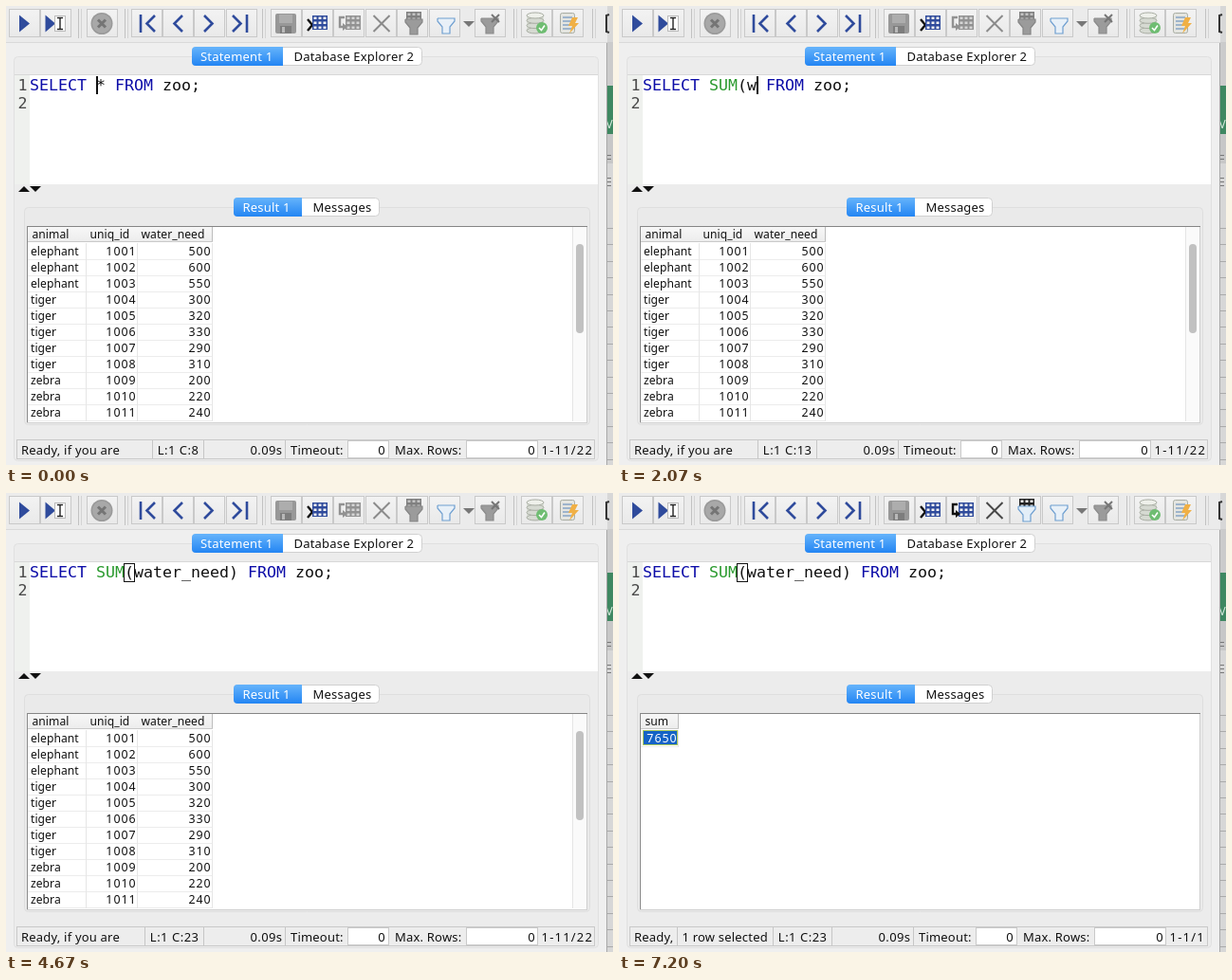
Write an HTML page with a canvas that moves like this. It is 640 px wide and 484 px high and loops after 7.27 s.

```html
<!DOCTYPE html>
<html lang="en">
<head>
<meta charset="utf-8">
<title>SQL editor</title>
<style>
html, body { margin: 0; width: 100%; height: 100%; overflow: hidden; background: #ececec; }
canvas { display: block; width: 640px; height: 484px; }
</style>
</head>
<body>
<canvas id="stage" width="640" height="484"></canvas>
<script>
const ctx = document.getElementById('stage').getContext('2d');
const LOOP = 7270, RUN = 4900, SELECT = 6000, BLINK = 500;
const NAVY = '#2f4b9c', GREY = '#929292', LINE = '#c9c9c9';
const UI = '"Noto Sans", "Open Sans", sans-serif';
const MONO = '"DejaVu Sans Mono", monospace';
const TYPED = 'SUM(water_need)';
const KEYS = [600, 870, 1070, 1700, 2000, 2150, 2270, 2400, 2500, 2750, 2930, 3070, 3200, 3330, 3600];
const ERASE = 330;
const NEEDS = [500, 600, 550, 300, 320, 330, 290, 310, 200, 220, 240];

function box(x, y, w, h, fill, stroke) {
  if (fill) { ctx.fillStyle = fill; ctx.fillRect(x, y, w, h); }
  if (stroke) {
    ctx.strokeStyle = stroke;
    ctx.lineWidth = 1;
    ctx.strokeRect(x + .5, y + .5, w - 1, h - 1);
  }
}

function round(x, y, w, h, r, fill, stroke) {
  ctx.beginPath();
  ctx.roundRect(x, y, w, h, r);
  if (fill) { ctx.fillStyle = fill; ctx.fill(); }
  if (stroke) { ctx.strokeStyle = stroke; ctx.lineWidth = 1; ctx.stroke(); }
}

function trace(pts) {
  ctx.beginPath();
  for (let i = 0; i < pts.length; i += 2) ctx.lineTo(pts[i], pts[i + 1]);
}

function poly(fill, ...pts) {
  trace(pts);
  ctx.closePath();
  ctx.fillStyle = fill;
  ctx.fill();
}

function line(color, width, ...pts) {
  trace(pts);
  ctx.strokeStyle = color;
  ctx.lineWidth = width;
  ctx.stroke();
}

function disc(x, y, r, fill) {
  ctx.beginPath();
  ctx.arc(x, y, r, 0, Math.PI * 2);
  ctx.fillStyle = fill;
  ctx.fill();
}

function text(s, x, y, { size = 13, gap = .2, color = '#111', align = 'left', font = UI } = {}) {
  ctx.font = `${size}px ${font}`;
  ctx.letterSpacing = gap + 'px';
  ctx.textAlign = align;
  ctx.fillStyle = color;
  ctx.fillText(s, x, y);
}

function vgrad(y0, y1, a, b) {
  const g = ctx.createLinearGradient(0, y0, 0, y1);
  g.addColorStop(0, a);
  g.addColorStop(1, b);
  return g;
}

function cross(x, y, r, color, width) {
  line(color, width, x - r, y - r, x + r, y + r);
  line(color, width, x + r, y - r, x - r, y + r);
}

function grid(x, y, cols, rows, color, cell = '#f2f2f2') {
  box(x, y, cols * 5 + 1, rows * 5, color);
  for (let c = 0; c < cols; c++)
    for (let r = 0; r < rows; r++) box(x + 1.5 + c * 5, y + 1.5 + r * 5, 3, 2.5, cell);
}

function funnel(x, y, fill, stroke) {
  const pts = [x - 9, y, x + 9, y, x + 9, y + 3, x + 4, y + 9, x + 4, y + 16, x - 4, y + 16, x - 4, y + 9, x - 9, y + 3];
  poly(fill, ...pts);
  line(stroke, 1.2, ...pts, x - 9, y);
}

function drum(x, y) {
  box(x - 9, y + 2, 18, 16, '#dce0d8');
  for (let i = 3; i >= 0; i--) {
    ctx.beginPath();
    ctx.ellipse(x, y + 2 + i * 5.3, 9, 3, 0, 0, Math.PI * 2);
    ctx.fillStyle = i ? '#d6dad2' : '#eef0ea';
    ctx.fill();
    ctx.strokeStyle = '#a9ada3';
    ctx.lineWidth = 1;
    ctx.stroke();
  }
}

function toolbar(selected) {
  box(0, 0, 634, 38, '#ebebeb');
  box(0, 38, 634, 1, '#d9d9d9');
  const groups = [[3, 2], [85, 1], [132, 4], [279, 6], [494, 1], [543, 2]];
  for (const [x, n] of groups)
    for (let i = 0; i < n; i++) box(x + i * 33.4 | 0, 3, 33, 30, vgrad(3, 33, '#f3f3f3', '#e9e9e9'), LINE);
  for (const x of [76, 125, 270, 535, 618]) {
    box(x, 3, 1, 31, '#c2c2c2');
    box(x + 3, 3, 1, 31, '#d4d4d4');
  }

  poly(NAVY, 14, 9.5, 25, 18.5, 14, 27.5);
  poly(NAVY, 41.5, 9.5, 52, 18.5, 41.5, 27.5);
  box(51, 10, 12, 17, '#fbfbfb', '#bbb');
  line('#222', 1.4, 54, 12.5, 60, 12.5);
  line('#222', 1.4, 57, 12.5, 57, 24.5);
  line('#222', 1.4, 54, 24.5, 60, 24.5);

  disc(101, 18.5, 11.5, '#9a9a9a');
  disc(101, 18.5, 10, '#a8a8a8');
  cross(101, 18.5, 4, '#757575', 3);

  line(NAVY, 2.6, 142, 9, 142, 28);
  line(NAVY, 2.6, 157, 10, 148.5, 18.5, 157, 27);
  line(NAVY, 2.6, 186, 10, 177.5, 18.5, 186, 27);
  line(NAVY, 2.6, 209, 10, 217.5, 18.5, 209, 27);
  line(NAVY, 2.6, 239, 10, 247.5, 18.5, 239, 27);
  line(NAVY, 2.6, 254, 9, 254, 28);

  round(284, 8, 22, 21, 2, '#989898');
  box(288, 9, 14, 9, '#adadad');
  box(289, 21, 12, 8, '#7d7d7d');
  box(291, 22, 3, 6, '#b8b8b8');

  line('#111', 2.4, 318, 14, 323, 20, 318, 26);
  grid(323, 10, 3, 3, NAVY);
  const dup = selected ? NAVY : GREY, arrow = selected ? '#111' : GREY;
  grid(358, 10, 3, 3, dup, selected ? '#f2f2f2' : '#d5d5d5');
  line(arrow, 2.4, 357, 12, 352, 12, 352, 22, 357, 22);
  poly(arrow, 355, 18, 360, 22, 355, 26);
  cross(396, 18.5, 8.5, selected ? '#484848' : '#8b8b8b', 2);

  grid(422, 6, 3, 2, selected ? '#222' : '#808080', selected ? '#f2f2f2' : '#c4c4c4');
  funnel(430, 14, selected ? '#e3eef8' : '#9b9b9b', selected ? '#6f9fd0' : '#868686');
  funnel(464, 13, '#e8f0f8', '#6f9fd0');
  poly('#777', 482, 16, 494, 16, 488, 22);
  funnel(510, 13, '#9b9b9b', '#8b8b8b');
  cross(516, 13, 4, '#757575', 2);

  drum(558, 8);
  disc(565, 23, 6, '#6fbd72');
  line('#fff', 1.6, 562, 23, 564.5, 25.5, 568, 20.5);
  round(584.5, 7.5, 15, 21, 2, '#e4e5e0', '#a9ada3');
  for (let y = 11; y < 27; y += 4) box(587, y, 10, 2, '#9db4cc');
  poly('#f0b045', 597, 12, 603, 12, 600, 18, 604, 18, 594, 29, 597, 21, 593, 21);
  line('#333', 2, 636, 9, 633, 10, 633, 27, 636, 28);
}

function backdrop() {
  box(634, 0, 6, 484, '#d7d7d7');
  box(634, 38, 6, 46, '#cbcbcb');
  box(634, 84, 6, 51, '#3f8861');
  text('V', 632.5, 129, { size: 12, color: '#d8eade' });
  box(634, 135, 6, 31, '#c7c7c7');
  for (const y of [157, 161, 181, 185, 189]) box(634, y, 4, 1, '#777');
  for (let y = 234; y < 484; y += 17.4) box(634, Math.round(y), 6, 1, '#aaa');
  box(633, 0, 1, 484, '#a9a9a9');
}

function tabs(x, mid, end, y, first, second, fx, sx) {
  round(x + .5, y + .5, end - x, 19, 4, '#fff', '#d0d0d0');
  round(x, y, mid - x, 20, [4, 0, 0, 4], vgrad(y, y + 20, '#66b4fb', '#2385f3'));
  text(first, fx, y + 15, { color: '#fff' });
  text(second, sx, y + 15);
}

function editor(t) {
  box(9, 72, 615, 116, '#fff');
  box(9, 72, 16, 116, '#eff1ee');
  box(9, 72, 615, 1, '#d8d8d8');
  const n = KEYS.filter(k => t >= k).length;
  const word = n ? TYPED.slice(0, n) : t < ERASE ? '*' : '';
  const code = (s, x, y, color) => text(s, x, y, { size: 16.61, gap: 0, color, font: MONO });
  const put = (s, col, color) => code(s, 25 + col * 10, 89, color);
  const end = 7 + word.length;
  code('1', 12.5, 89, '#4a4a4a');
  code('2', 12.5, 108, '#4a4a4a');
  put('SELECT', 0, '#0c0ca8');
  const fn = n >= 3 ? 3 : 0;
  put(word.slice(0, fn), 7, '#2a9a2e');
  put(word.slice(fn), 7 + fn, '#111');
  put('FROM', end + 1, '#0c0ca8');
  put('zoo;', end + 6, '#111');
  if (n === TYPED.length) box(124, 74, 12, 20, null, '#111');

  const key = [ERASE, ...KEYS].filter(k => t >= k).pop() || 0;
  const since = n === TYPED.length ? Math.max(0, t - 3850) : t - key;
  const lit = t < SELECT && Math.floor(since / BLINK) % 2 === 0;
  if (lit) box(25 + (7 + n) * 10, 74, 2, 19, '#111');
  return 8 + n;
}

function header(label, x, w) {
  box(x, 233, w, 16, vgrad(233, 249, '#f7f7f7', '#ececec'));
  box(x + w - 1, 233, 1, 16, '#bdbdbd');
  box(x, 248, w, 1, '#c9c9c9');
  text(label, x + 4.5, 245, { size: 12.1, gap: .05 });
}

function number(v, right, y, color) {
  text(String(v), right, y, { size: 12.4, gap: .95, align: 'right', color });
}

function fullTable() {
  header('animal', 23, 62);
  header('uniq_id', 84, 55);
  header('water_need', 138, 80);
  NEEDS.forEach((need, i) => {
    const y = 263 + i * 17;
    const name = i < 3 ? 'elephant' : i < 8 ? 'tiger' : 'zebra';
    text(name, 26, y, { size: 12.1, gap: .05 });
    number(1001 + i, 137.5, y);
    number(need, 216.5, y);
    box(23, y + 4, 195, 1, '#ececec');
  });
  for (const x of [84, 138, 217]) box(x, 250, 1, 188, '#e6e6e6');
  box(597, 233, 15, 205, '#fafafa');
  box(597, 233, 1, 205, '#e5e5e5');
  round(601, 251, 8, 94, 4, '#c1c1c1');
}

function sumTable(selected) {
  header('sum', 23, 40);
  box(23, 267, 40, 1, '#ececec');
  box(62, 250, 1, 18, '#e6e6e6');
  if (selected) box(25, 250, 37, 16, '#1462c6', '#a9c65a');
  number(7650, 61.5, 263, selected ? '#fff' : '#111');
}

function results(t) {
  round(19.5, 212.5, 596, 229, 4, '#eaeaea', '#dedede');
  tabs(240, 312, 393, 202, 'Result 1', 'Messages', 249.5, 323.5);
  box(22, 232, 591, 208, '#fff', '#cfcfcf');
  box(22, 232, 591, 1, '#858585');
  box(22, 232, 1, 207, '#8c8c8c');
  if (t < RUN) fullTable();
  else sumTable(t >= SELECT);
}

function status(t, column) {
  const done = t >= RUN, dx = done ? 16 : 0;
  const y = 473, place = 'L:1 C:' + column;
  box(11, 457, 610, 21, '#ededed', LINE);
  const sep = x => box(x, 458, 1, 19, '#c6c6c6');
  if (t >= SELECT) {
    text('Ready,', 16, y);
    sep(61);
    text('1 row selected', 66.5, y);
  } else {
    text('Ready, if you are', 16, y);
  }
  sep((column < 10 ? 154 : 146) + dx);
  text(place, 203.5 + dx, y, { gap: .5, align: 'right' });
  sep(208 + dx);
  text('0.09s', 291.5 + dx, y, { gap: .4, align: 'right' });
  sep(294 + dx);
  text('Timeout:', 300 + dx, y);
  box(360 + dx, 458, 44, 19, '#fff', LINE);
  text('0', 400 + dx, y, { align: 'right' });
  text('Max. Rows:', 410 + dx, y);
  box(485 + dx, 458, 76, 19, '#fff', LINE);
  text('0', 558 + dx, y, { align: 'right' });
  text(done ? '1-1/1' : '1-11/22', 564.5 + dx, y, { gap: 1.2 });
}

function draw(t) {
  box(0, 0, 640, 484, '#efefef');
  backdrop();
  toolbar(t >= SELECT);
  round(8.5, 53.5, 616, 426, 4, '#ececec', '#e0e0e0');
  tabs(196, 292, 438, 43, 'Statement 1', 'Database Explorer 2', 205, 303.5);
  const column = editor(t);
  poly('#111', 13, 196, 19, 190, 25, 196);
  poly('#111', 25, 190, 37, 190, 31, 196);
  results(t);
  status(t, column);
}

let start;
function tick(now) {
  start ??= now;
  draw((now - start) % LOOP);
  requestAnimationFrame(tick);
}
draw(0);
requestAnimationFrame(tick);
</script>
</body>
</html>
```
